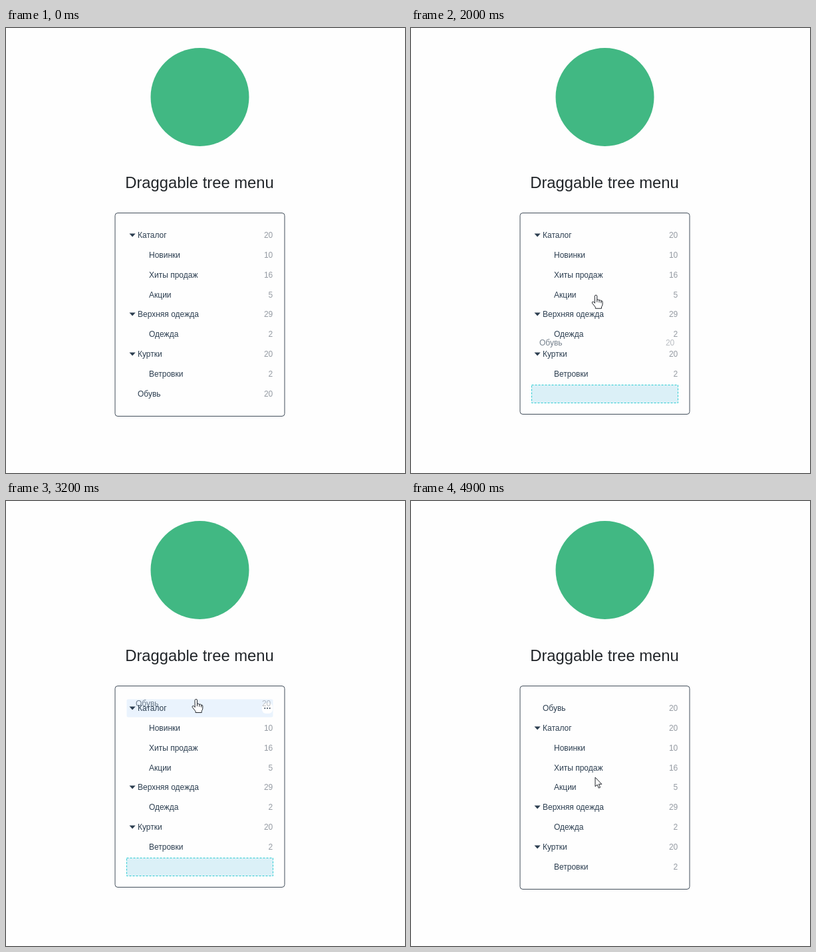
These frames come from a looping animation (600x670 px, 5 s). An HTML page:

```html
<!DOCTYPE html>
<html lang="ru">
<head>
<meta charset="utf-8">
<title>Draggable tree menu</title>
<style>
  html, body { margin: 0; width: 100%; height: 100%; overflow: hidden; background: #fefefe; }
  svg { display: block; width: 600px; height: 670px; }
  text { font: 12px "Liberation Sans", Arial, sans-serif; fill: #2c3e50; }
  .title { font-size: 23.8px; fill: #212529; text-anchor: middle; }
  .count { fill: #959ba3; text-anchor: end; }
  .hover { fill: #eaf3fd; }
  .slot { fill: #dbf0f7; stroke: #2bcbd2; stroke-dasharray: 3 2; }
  .frame { fill: none; stroke: #434e5b; }
  .pointer { fill: #fff; stroke: #22262c; stroke-linejoin: round; stroke-linecap: round; }
</style>
</head>
<body>
<svg id="stage" viewBox="0 0 600 670">
  <circle cx="291.5" cy="104" r="74" fill="#41b883"/>
  <text class="title" x="291" y="241">Draggable tree menu</text>
</svg>
<script>
const LOOP = 5000, STEP = 100;
const TOP = 298, PITCH = 29.85, ROW_H = 27, LEFT = 181.5, WIDTH = 220;
const ENTER = 700, GRAB = 1800, SHIFT = 3900, DROP = 4400, LEAVE = 4900;

const LEAF = 0, GROUP = 1, CHILD = 2;
const items = [
  ["Каталог", 20, GROUP], ["Новинки", 10, CHILD], ["Хиты продаж", 16, CHILD],
  ["Акции", 5, CHILD], ["Верхняя одежда", 29, GROUP], ["Одежда", 2, CHILD],
  ["Куртки", 20, GROUP], ["Ветровки", 2, CHILD], ["Обувь", 20, LEAF]
];
const LAST = items.length - 1;

const linear = k => k;
const easeIn = k => k * k;
const easeOut = k => 1 - (1 - k) ** 2;
const smooth = k => k * k * (3 - 2 * k);

const origin = { x: 522, y: 652 };
const held = { x: 288, y: 545 };
const target = { x: 293, y: 320 };

// each move ends at the given time and place
const moves = [
  { until: 1200, ...held, ease: easeOut },
  { until: 1700, ...held, ease: linear },
  { until: 2200, x: 273, y: 325, ease: smooth },
  { until: 3100, x: 285, y: 299, ease: linear },
  { until: 3500, x: 289, y: 298, ease: linear },
  { until: SHIFT, ...target, ease: easeIn },
  { until: DROP, ...target, ease: linear },
  { until: LEAVE, x: 277, y: 416.5, ease: smooth }
];

function pointerAt(t) {
  if (t < ENTER || t > LEAVE) return null;
  let from = { until: ENTER, ...origin };
  for (const to of moves) {
    if (t <= to.until) {
      const k = to.ease((t - from.until) / (to.until - from.until));
      return { x: from.x + (to.x - from.x) * k, y: from.y + (to.y - from.y) * k };
    }
    from = to;
  }
}

const stage = document.getElementById("stage");

function add(parent, tag, attrs, text) {
  const el = document.createElementNS("http://www.w3.org/2000/svg", tag);
  for (const key in attrs) el.setAttribute(key, attrs[key]);
  if (text !== undefined) el.textContent = text;
  return parent.appendChild(el);
}

const move = (el, x, y) => el.setAttribute("transform", `translate(${x} ${y})`);
const show = (el, on) => el.setAttribute("display", on ? "inline" : "none");

function makeRow([label, count, level]) {
  const g = add(stage, "g", {});
  const hover = add(g, "rect", { class: "hover", x: LEFT, y: 0.5, width: WIDTH, height: ROW_H, rx: 2 });
  if (level === GROUP) add(g, "path", { d: "M185.5 11.5h9.2l-4.6 5z", fill: "#2c3e50" });
  add(g, "text", { x: level === CHILD ? 215 : 198, y: 18 }, label);
  const number = add(g, "text", { class: "count", x: 401.3, y: 18 }, count);
  const more = add(g, "g", {});
  add(more, "rect", { x: 385, y: 6, width: 16, height: 16, rx: 6, fill: "#fff" });
  for (const dx of [-1, 0, 1]) {
    add(more, "circle", { cx: 393 + 3.7 * dx, cy: 14, r: 0.95, fill: "#2c3e50" });
  }
  return { g, hover, number, more };
}

const frame = add(stage, "rect", { class: "frame", x: 164, y: 278.5, width: 255, rx: 4 });
const slot = add(stage, "rect", { class: "slot", x: LEFT, y: 0.5, width: WIDTH, height: ROW_H });
const rows = items.map(makeRow);

const ghost = makeRow(items[LAST]);
ghost.g.setAttribute("opacity", 0.65);
show(ghost.hover, false);
show(ghost.more, false);

const arrow = add(stage, "path", {
  class: "pointer",
  d: "M0 0V13.3L3.1 10.6L5.3 15.7L7.5 14.7L5.3 9.8H9.4Z"
});
const hand = add(stage, "g", { class: "pointer" });
add(hand, "path", {
  d: "M-2 1.3Q-1.8 -.3 -.2 -.3Q1.5 -.3 1.5 1.4V6.8Q3.4 5.7 4.7 7.5" +
     "Q6.5 6.6 7.5 8.4Q9.8 7.8 9.8 10.2V13.5Q9.5 16 8.2 17.5V19.8H-1V17.8" +
     "L-5.8 11.7Q-6.4 9.9 -4.6 9.6Q-3.3 9.6 -2 11.5Z"
});
add(hand, "path", { d: "M1.5 7v3M4.7 7.6v3M7.6 8.4v3", fill: "none" });

const slotTop = i => Math.round(TOP + PITCH * i);

function rowTop(i, t) {
  if (t >= DROP) return slotTop((i + 1) % items.length);
  const k = Math.min(1, Math.max(0, (t - SHIFT + STEP) / (2 * STEP)));
  return slotTop(i) + ROW_H * k;
}

function isHovered(i, top, point, t, dragging) {
  if (dragging) return i === 0 && t >= 2800 && t < 3400;
  return !!point && point.x > LEFT && point.x < LEFT + WIDTH &&
    point.y > top && point.y < top + ROW_H;
}

function draw(t) {
  const point = pointerAt(t);
  const dragging = t >= GRAB && t < DROP;
  let active = dragging;

  rows.forEach((row, i) => {
    const top = rowTop(i, t);
    const on = isHovered(i, top, point, t, dragging);
    active = active || on;
    move(row.g, 0, top);
    show(row.g, !(dragging && i === LAST));
    show(row.hover, on);
    show(row.more, on);
    show(row.number, !on);
  });

  frame.setAttribute("height", dragging ? 303 : 306);
  show(slot, dragging);
  move(slot, 0, slotTop(t < SHIFT ? LAST : 0));

  // the dragged copy trails the pointer by one step
  show(ghost.g, dragging);
  if (dragging) {
    const p = pointerAt(t - STEP);
    move(ghost.g, Math.round(p.x - held.x), Math.round(slotTop(LAST) + p.y - held.y));
  }

  show(hand, point && active);
  show(arrow, point && !active);
  if (point) move(active ? hand : arrow, point.x, point.y);
}

function tick() {
  const t = performance.now() % LOOP;
  draw(Math.floor(t / STEP) * STEP);
  requestAnimationFrame(tick);
}
tick();
</script>
</body>
</html>
```
